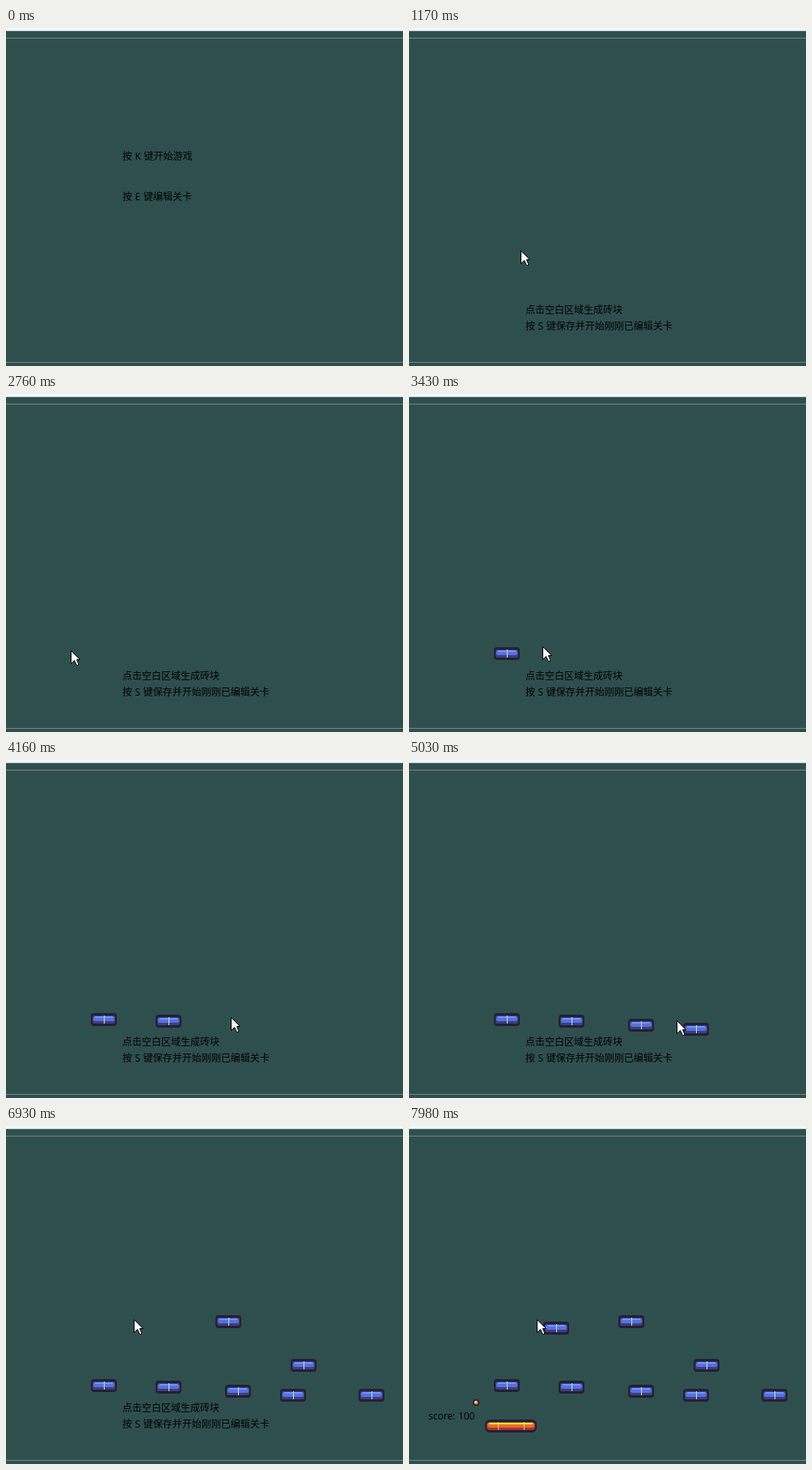
An HTML page with a canvas for the animation above (8 s loop, 491 px wide and 418 px high).

```html
<!DOCTYPE html>
<html lang="zh-CN">
<head>
<meta charset="utf-8">
<title>Brick editor</title>
<style>
  html, body { margin: 0; width: 100%; height: 100%; overflow: hidden; background: #2f4f4f; }
  canvas { display: block; }
</style>
</head>
<body>
<canvas id="stage" width="491" height="418"></canvas>
<script>
const ctx = document.getElementById('stage').getContext('2d');
const LOOP = 8000, POINTER_IN = 80, EDIT_START = 930, GAME_START = 7420, BALL_START = 7920;
const INK = '#222034';

// Each brick appears on a click; swing is how far the pointer overshoots on its way there.
const bricks = [
  { time: 3150, x: 105, y: 313 },
  { time: 3860, x: 185, y: 315, swing: 0.4 },
  { time: 4570, x: 271, y: 320, swing: 0.65 },
  { time: 5000, x: 339, y: 325 },
  { time: 5390, x: 436, y: 325 },
  { time: 5950, x: 352, y: 288 },
  { time: 6470, x: 259, y: 234 },
  { time: 7110, x: 166, y: 242 }
];

const stroke = (start, end, x, y, swing = 0) => ({ start, end, x, y, swing });

// The pointer idles first, then leaves each brick shortly after its click
// and rests at the next spot before clicking again.
const strokes = [
  stroke(50, 410, 134, 267),
  stroke(630, 690, 140, 263),
  stroke(1110, 1170, 138, 275),
  stroke(1200, 1350, 130, 278),
  stroke(1350, 1590, 138, 263),
  stroke(1760, 2580, 61, 324),
  stroke(2600, 2910, 97, 310),
  ...bricks.slice(1).map((brick, i) =>
    stroke(bricks[i].time + 80, brick.time - 200, brick.x - 8, brick.y - 3, brick.swing))
];

const clamp = (v, lo, hi) => Math.min(hi, Math.max(lo, v));

function pointerAt(t) {
  let x = 363, y = 398;
  for (const s of strokes) {
    const u = clamp((t - s.start) / (s.end - s.start), 0, 1);
    const e = u * u * (3 - 2 * u) + s.swing * Math.sin(Math.PI * u);
    x += (s.x - x) * e;
    y += (s.y - y) * e;
  }
  return [Math.round(x), Math.round(y)];
}

function rect(color, x, y, w, h) {
  ctx.fillStyle = color;
  ctx.fillRect(x, y, w, h);
}

function rounded(color, x, y, w, h, r) {
  ctx.fillStyle = color;
  ctx.beginPath();
  ctx.roundRect(x, y, w, h, r);
  ctx.fill();
}

function text(str, x, baseline) {
  ctx.fillStyle = '#000';
  ctx.fillText(str, x, baseline);
}

// Glossy bar with an upright seam in the middle of every 32 px.
function drawBar(x, y, w, radius, [shade, body, shine, seam], seams) {
  rounded(INK, x, y, w, 16, radius);
  rounded(shade, x + 2, y + 3, w - 4, 10, radius - 2);
  rounded(body, x + 3, y + 4, w - 6, 6, radius - 2);
  rect(shine, x + 5, y + 4, w - 10, 2);
  for (let i = 0; i < seams; i++) rect(seam, x + 16 + 32 * i, y + 3, 1, 10);
}

const drawBrick = ({ x, y }) =>
  drawBar(x, y, 32, 4, ['#3f3f74', '#5b6ee1', '#639bff', '#cbdbfc'], 1);

const drawPaddle = (x, y) =>
  drawBar(x, y, 64, 6, ['#ac3232', '#df7126', '#fbf236', '#eec39a'], 2);

function drawBall(x, y) {
  rounded(INK, x, y, 8, 8, 4);
  rounded('#df7126', x + 1.5, y + 1.5, 5, 5, 2.5);
  rounded('#ffe9b8', x + 2, y + 2, 3, 3, 1.5);
}

function drawPointer(x, y) {
  const outline = [[0, 0], [0, 16], [4, 12], [7, 18], [9, 18], [9, 16], [7, 11], [11, 11]];
  ctx.beginPath();
  for (const [dx, dy] of outline) ctx.lineTo(x + dx + 0.5, y + dy + 0.5);
  ctx.closePath();
  ctx.fillStyle = '#fff';
  ctx.fill();
  ctx.strokeStyle = '#000';
  ctx.lineWidth = 1;
  ctx.stroke();
}

function drawGame(t) {
  drawPaddle(94, 363);
  text('score: 100', 24, 363);
  const travel = 7.5 * Math.max(0, Math.floor((t - BALL_START) / 30));
  drawBall(94 - travel, 353 - travel);
}

function draw(t) {
  rect('#2f4f4f', 0, 0, 491, 418);
  rect('#f4f8f8', 0, 0, 491, 3);
  rect('#b4c1c1', 0, 3, 491, 1);
  for (const y of [12, 413]) rect('#808080', 0, y, 491, 1);

  ctx.font = '12px "Open Sans", "Noto Sans CJK SC", "Noto Sans CJK", sans-serif';
  ctx.wordSpacing = '0.5px';
  bricks.filter(brick => t >= brick.time).forEach(drawBrick);

  if (t < EDIT_START) {
    text('按 K 键开始游戏', 144, 163);
    text('按 E 键编辑关卡', 144, 213);
  } else if (t < GAME_START) {
    text('点击空白区域生成砖块', 144, 353);
    text('按 S 键保存并开始刚刚已编辑关卡', 144, 373);
  } else {
    drawGame(t);
  }
  if (t >= POINTER_IN) drawPointer(...pointerAt(t));
}

const start = performance.now();
function tick() {
  draw((performance.now() - start) % LOOP);
  requestAnimationFrame(tick);
}
tick();
</script>
</body>
</html>
```
